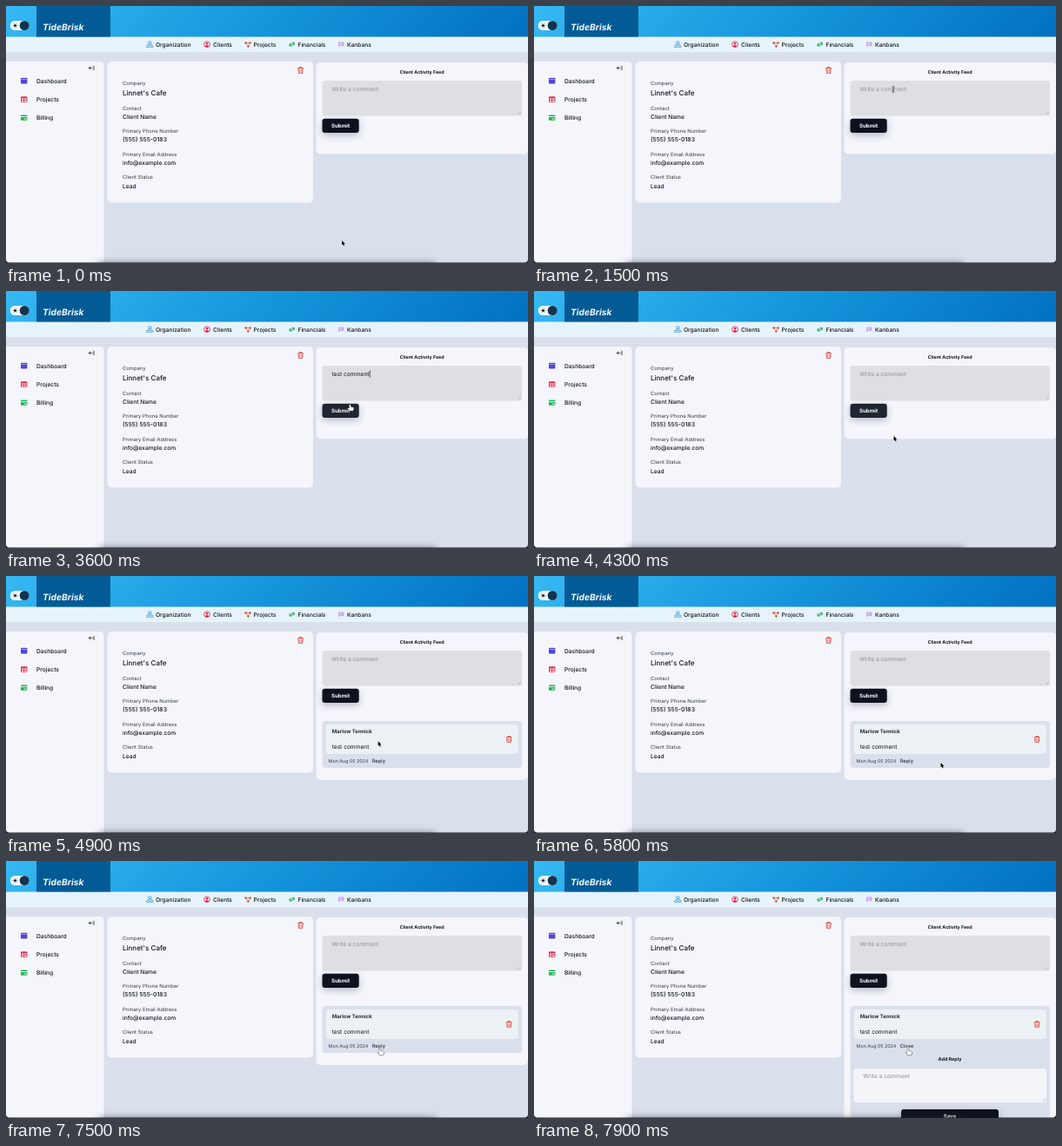
Animation of 600 by 296 pixels, one loop 8 s. Source, as an HTML page with a canvas:

```html
<!DOCTYPE html>
<html lang="en">
<head>
<meta charset="utf-8">
<title>Client page</title>
<style>
html, body { margin: 0; width: 100%; height: 100%; overflow: hidden; background: #dae0eb; }
canvas { display: block; width: 600px; height: 296px; }
</style>
</head>
<body>
<canvas id="stage"></canvas>
<script>
const W = 600, H = 296, LOOP = 8000, TICK = 100;
const canvas = document.getElementById('stage');
const ctx = canvas.getContext('2d');
const ratio = window.devicePixelRatio || 1;
canvas.width = W * ratio;
canvas.height = H * ratio;
ctx.textRendering = 'geometricPrecision';

const INK = '#10151f', CARD = '#f4f6fb', PAGE = '#dae0eb', RED = '#e2483d', MUTED = '#8b8f98';
const COMMENT = 'test comment';

// Pointer path: time, x, y
const PATH = [
  [0, 386, 270], [100, 392, 215], [200, 406, 131], [300, 417, 95], [500, 417, 95],
  [800, 413, 96], [3200, 413, 96], [3700, 391, 139], [4000, 388, 138], [4100, 388, 138],
  [4300, 413.5, 167], [5000, 430, 194], [5300, 430, 194], [5800, 467.5, 215],
  [6200, 412, 190], [6500, 393, 178], [6900, 420.5, 185], [7100, 435, 229],
  [7200, 434, 227], [7500, 430, 216], [8000, 430, 216]
];

// Typed letters: time, count
const TYPING = [
  [2000, 1], [2100, 2], [2200, 3], [2300, 4], [2400, 5], [2500, 6], [2600, 7],
  [2800, 8], [2900, 10], [3000, 11], [3100, 12], [4000, 0]
];

function box(x, y, w, h, r, fill) {
  ctx.beginPath();
  ctx.roundRect(x, y, w, h, r);
  ctx.fillStyle = fill;
  ctx.fill();
}

function text(str, x, y, size, color = INK, weight = 500, align = 'left', style = '') {
  ctx.font = `${style} ${weight} ${size}px Inter, "Noto Sans", sans-serif`;
  ctx.textAlign = align;
  ctx.fillStyle = color;
  ctx.fillText(str, x, y);
  return ctx.measureText(str).width;
}

function line(d, color, width = 0.8) {
  ctx.strokeStyle = color;
  ctx.lineWidth = width;
  ctx.stroke(new Path2D(d));
}

function dot(x, y, r, fill) {
  ctx.beginPath();
  ctx.arc(x, y, r, 0, Math.PI * 2);
  ctx.fillStyle = fill;
  ctx.fill();
}

function at(x, y, draw) {
  ctx.save();
  ctx.translate(x, y);
  draw();
  ctx.restore();
}

function shadowed(color, blur, offset, draw) {
  ctx.save();
  ctx.shadowColor = color;
  ctx.shadowBlur = blur * ratio;
  ctx.shadowOffsetY = offset * ratio;
  draw();
  ctx.restore();
}

function trash(x, y) {
  at(x, y, () => {
    line('M-3.2-2.3H3.2M-1.2-2.4V-3.5H1.2V-2.4M-2.5-2.2L-2.1 3.3H2.1L2.5-2.2', RED, 0.95);
    line('M-.8-.9V2.1M.8-.9V2.1', RED, 0.6);
  });
}

function button(label, x, y, w, h, fill) {
  shadowed('rgba(20,30,60,.28)', 8, 3, () => box(x, y, w, h, 3, fill));
  text(label, x + w / 2, y + h / 2 + 2.2, 6.1, '#fff', 700, 'center');
}

function textArea(x, y, w, h, fill) {
  box(x, y, w, h, 3, fill);
  const r = x + w - 1.5, b = y + h - 1.5;
  line(`M${r - 3.5} ${b}L${r} ${b - 3.5}M${r - 1.5} ${b}L${r} ${b - 1.5}`, '#9a9da3', 0.5);
}

function header() {
  const g = ctx.createLinearGradient(141, -141, 459, 176);
  g.addColorStop(0, '#36b8f3');
  g.addColorStop(0.5, '#1595dc');
  g.addColorStop(1, '#0270c0');
  box(0, 0, W, 35.4, 0, g);
  box(35, 0, 85, 35.4, 0, '#035b95');
  text('TideBrisk', 42, 28.2, 10.2, '#f3f8fc', 700, 'left', 'italic');

  box(4.8, 17, 22, 11, 5.5, '#f6fafc');
  dot(21.2, 22.5, 5.5, '#12344f');
  dot(10.5, 22.5, 1.6, '#182330');
  for (let i = 0; i < 8; i++) {
    const a = i * Math.PI / 4;
    dot(10.5 + 2.6 * Math.cos(a), 22.5 + 2.6 * Math.sin(a), 0.4, '#182330');
  }
}

function nav() {
  box(0, 35, W, 18, 0, '#e7f3fb');
  const items = [['Organization', 172], ['Clients', 238], ['Projects', 284.5], ['Financials', 335.5], ['Kanbans', 392]];
  for (const [label, x] of items) text(label, x, 46.8, 6.67);

  at(165.3, 44.2, () => {
    line('M-1.5-3.2H1.5V-.8H-1.5ZM-3.5 1H-.8V3.3H-3.5ZM.8 1H3.5V3.3H.8ZM0-.8L-2 1M0-.8L2 1', '#3c9bd0', 0.75);
  });
  at(231, 44.2, () => {
    line('M3.4 0A3.4 3.4 0 1 1-3.4 0A3.4 3.4 0 1 1 3.4 0', '#dc2645', 0.8);
    dot(0, -1, 1.25, '#dc2645');
    ctx.fill(new Path2D('M-2.3 2.3Q0-.6 2.3 2.3Q0 3.8-2.3 2.3'));
  });
  at(278, 44.2, () => {
    line('M-2.4-1.8H2.5L.4 2.2Z', '#b5705c', 0.7);
    dot(-2.5, -1.8, 1.25, '#e0452f');
    dot(2.6, -1.8, 1.2, '#e0452f');
    dot(0.4, 2.3, 1.2, '#d9562f');
  });
  at(328.7, 44.2, () => {
    ctx.rotate(-0.45);
    box(-3.4, -1.7, 6.8, 3.4, 0.7, '#4fb57a');
    dot(0, 0, 1.1, '#b9e6cb');
  });
  at(385.3, 44.2, () => {
    ctx.fillStyle = '#cba6f2';
    ctx.fill(new Path2D('M-3.2-2.8H3.2V1.9H-1.2L-3.2 3.4Z'));
    line('M-1.8-1.2H1.8M-1.8.3H.8', '#f3eafd', 0.6);
  });
}

function sidebar() {
  box(0, 64, 112.5, H - 64, [0, 5, 0, 0], CARD);
  line('M101 68.8V74M99.6 71.4H95.3M97.2 69.5L95.3 71.4L97.2 73.3', INK, 0.75);
  text('Dashboard', 35, 88.6, 6.67);
  text('Projects', 35, 109.6, 6.67);
  text('Billing', 35, 131, 6.67);

  box(17, 82.8, 7.4, 6.8, 0.8, '#5146d8');
  box(17.8, 84.2, 5.8, 0.7, 0, '#c8c5f6');
  box(17, 104.2, 7.4, 6.6, 0.8, '#e02b50');
  for (const x of [17.9, 21.1]) for (const y of [106.2, 108.6]) box(x, y, 2.5, 1.5, 0, '#f8dbe2');
  box(17, 125.5, 7.4, 6.2, 0.8, '#22b35c');
  box(17, 127.1, 7.4, 1, 0, '#eaf8ef');
  box(20.8, 129.6, 3, 1.1, 0, '#d8f2e2');
}

function details() {
  box(116.5, 64, 236.5, 162.5, 5, CARD);
  trash(338.6, 74);
  const rows = [
    ['Company', "Linnet's Cafe", 91.4, 102.9, 8],
    ['Contact', 'Client Name', 119.6, 129.8, 6.67],
    ['Primary Phone Number', '(555) 555-0183', 146.2, 156.4, 6.9],
    ['Primary Email Address', 'info@example.com', 172.7, 183.1, 6.67],
    ['Client Status', 'Lead', 199.4, 209.5, 6.67]
  ];
  for (const [label, value, y1, y2, size] of rows) {
    text(label, 134, y1, 5.85, '#343a45', 400);
    text(value, 134, y2, size);
  }
}

function typedCount(t) {
  let n = 0;
  for (const [time, count] of TYPING) if (t >= time) n = count;
  return n;
}

function feed(t) {
  const posted = t >= 4500, replying = t >= 7800;
  const bottom = replying ? H + 10 : posted ? 235 : 170.5;
  box(356.5, 65, 243.5, bottom - 65, 5, CARD);
  text('Client Activity Feed', 478.2, 77.6, 5.35, INK, 700, 'center');

  textArea(363.5, 86, 229.5, 40.5, '#dedfe2');
  const typed = COMMENT.slice(0, typedCount(t));
  let caretX = 374.8;
  if (typed) caretX += text(typed, 374.5, 98.3, 6.67, INK, 400);
  else text('Write a comment', 374.5, 98.3, 6.67, MUTED, 400);
  const caret = (t >= 1000 && t < 1500) || (t >= 2000 && t < 3700);
  if (caret) box(caretX, 91.5, 0.7, 8.3, 0, '#111');

  const hover = t >= 3600 && t < 4400;
  button('Submit', 363.5, 129.7, 42.2, 16.2, hover ? '#1f2531' : '#0d121e');
  if (posted) comment(replying);
}

function comment(replying) {
  box(363.5, 167, 229.5, replying ? H : 54, 4, PAGE);
  box(367.5, 171, 221.5, 34, 4, '#ebf1f4');
  text('Marlow Tennick', 374.7, 181.2, 6, INK, 600);
  text(COMMENT, 374.7, 198.5, 6.6, INK, 400);
  trash(578.2, 188);
  text('Mon Aug 05 2024', 370.6, 215, 5.35, '#343a45', 400);
  text(replying ? 'Close' : 'Reply', 420.7, 215.3, 5.8, INK, 400);
  if (!replying) return;
  text('Add Reply', 478, 230.2, 5.4, INK, 700, 'center');
  textArea(367.5, 239, 221.5, 39, '#f3f5f9');
  text('Write a comment', 378.3, 250.4, 6.67, MUTED, 400);
  button('Save', 422, 286, 112, 16.2, '#0d121e');
}

// Soft dock shadow and the window's rounded lower edge
function windowEdge() {
  shadowed('rgba(40,45,55,.6)', 9, 0, () => box(106, H, 388, 10, 0, '#555'));
  const edge = new Path2D();
  edge.rect(0, 0, W, H);
  edge.roundRect(0, -10, W, H + 9.5, 4);
  ctx.fillStyle = '#14171c';
  ctx.fill(edge, 'evenodd');
}

function pointerAt(t) {
  const i = PATH.findIndex(p => p[0] > t);
  const [t0, x0, y0] = PATH[i - 1], [t1, x1, y1] = PATH[i];
  const k = (t - t0) / (t1 - t0);
  return [x0 + (x1 - x0) * k, y0 + (y1 - y0) * k];
}

function pointer(t) {
  if (t >= 2000 && t < 3200) return;
  const [x, y] = pointerAt(t);
  const inside = (l, top, r, b) => x >= l && x <= r && y >= top && y <= b;
  at(x, y, () => {
    ctx.lineJoin = 'round';
    if (inside(363, 86, 593, 127)) {
      line('M-1.4-3.4Q0-3.4 0-2.6Q0-3.4 1.4-3.4M0-2.6V2.6M-1.4 3.4Q0 3.4 0 2.6Q0 3.4 1.4 3.4', '#20242b', 0.7);
      return;
    }
    const hand = inside(363, 130, 406, 146) || (t > 7000 && inside(420, 209, 438, 218));
    const shape = new Path2D(hand
      ? 'M-.8.7Q0-.2.8.7V3L3.7 3.6Q4.5 3.9 4.3 5L3.6 7.6H-.6L-2.6 4.9Q-2.3 3.8-.8 4.9Z'
      : 'M0 0V5.6L1.2 4.5L2.1 6.6L3.2 6.1L2.3 4.1H4Z');
    ctx.strokeStyle = hand ? '#161a20' : '#fff';
    ctx.lineWidth = 0.8;
    ctx.stroke(shape);
    ctx.fillStyle = hand ? '#fff' : '#0a0a0c';
    ctx.fill(shape);
  });
}

function render(t) {
  ctx.setTransform(ratio, 0, 0, ratio, 0, 0);
  box(0, 0, W, H, 0, PAGE);
  nav();
  header();
  sidebar();
  details();
  feed(t);
  windowEdge();
  pointer(t);
}

const start = performance.now();
function loop() {
  const t = (performance.now() - start) % LOOP;
  render(Math.floor(t / TICK) * TICK);
  requestAnimationFrame(loop);
}
loop();
</script>
</body>
</html>
```
